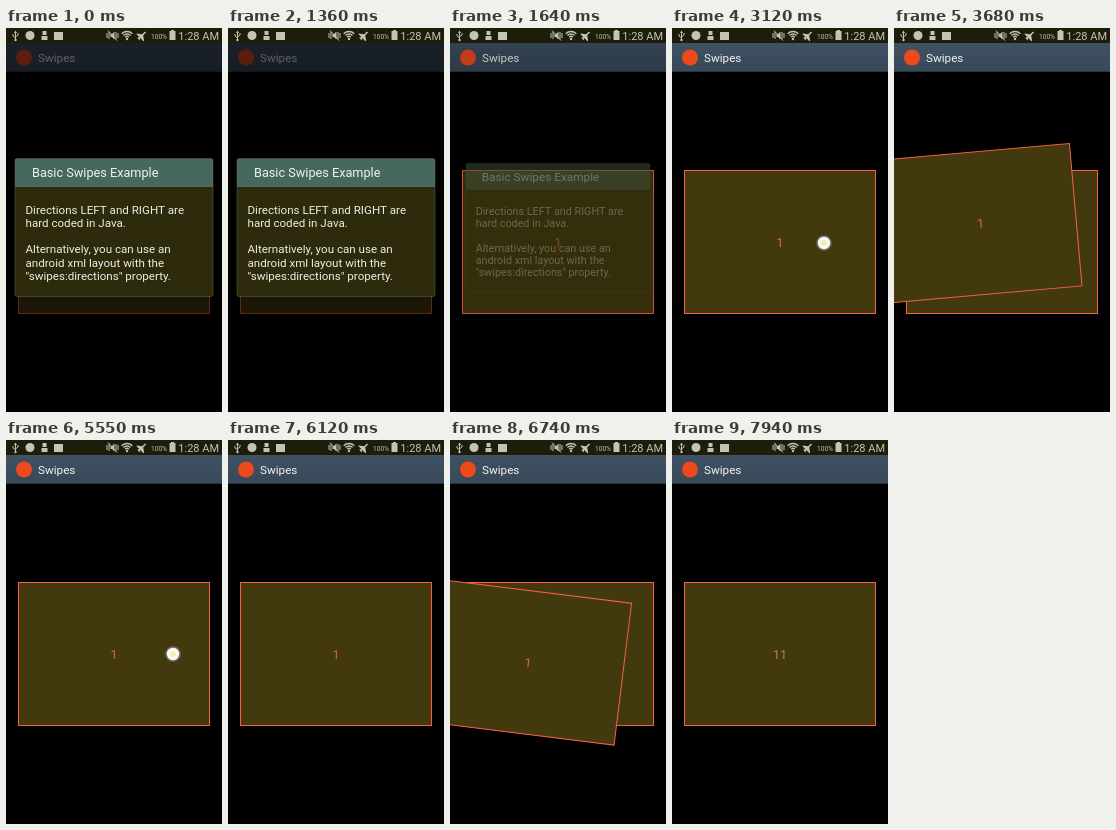
An HTML page with a canvas for the animation above (8000 ms loop, 216 by 384 pixels).

```html
<!DOCTYPE html>
<html lang="en">
<head>
<meta charset="utf-8">
<title>Swipes</title>
<style>
html, body { margin: 0; width: 100%; height: 100%; overflow: hidden; background: #000; }
canvas { display: block; width: 216px; height: 384px; }
</style>
</head>
<body>
<canvas id="stage"></canvas>
<script>
const W = 216, H = 384, LOOP = 8000;
const FONT = 'Roboto, "Noto Sans", sans-serif';
const canvas = document.getElementById('stage');
const ctx = canvas.getContext('2d');
const ratio = window.devicePixelRatio || 1;
canvas.width = W * ratio;
canvas.height = H * ratio;

const CARD = { x: 108, y: 214, w: 191, h: 143 };
const DIALOG = { x: 9, y: 130.5, w: 198, h: 138, split: 159 };
const TILT = 0.235;   // degrees per pixel of sideways drag
const RELEASE = 0.6;  // part of a gesture during which the finger is down

// side: 1 when held by the upper half, -1 by the lower; only the last drag is accepted
const gestures = [
  { start: 3120, end: 3800, touch: [152, 215], reach: [-112, -99], side: 1 },
  { start: 4480, end: 5100, touch: [119, 244], reach: [-4.5, 93], side: -1 },
  { start: 5550, end: 6120, touch: [167, 214], reach: [-100, -6], side: 1 },
  { start: 6290, end: 6860, touch: [150, 242], reach: [-110, 31], side: -1 },
  { start: 7480, end: 7940, touch: [62, 206], reach: [78, -9], side: 1, accepted: true }
];

const clamp = v => Math.max(0, Math.min(1, v));

// The finger speeds up; then the card springs back, or keeps flying if accepted.
function pull(p, accepted) {
  if (p < RELEASE || accepted) return (p / RELEASE) ** 2.4;
  return ((1 - p) / (1 - RELEASE)) ** 2;
}

function rect(color, x, y, w, h) {
  ctx.fillStyle = color;
  ctx.fillRect(x, y, w, h);
}

function disc(color, x, y, r) {
  ctx.fillStyle = color;
  ctx.beginPath();
  ctx.arc(x, y, r, 0, Math.PI * 2);
  ctx.fill();
}

function shape(color, path) {
  ctx.fillStyle = color;
  ctx.fill(new Path2D(path));
}

function line(color, path) {
  ctx.strokeStyle = color;
  ctx.lineWidth = 1;
  ctx.stroke(new Path2D(path));
}

function text(str, x, y, size, color, align = 'left') {
  ctx.font = `${size}px ${FONT}`;
  ctx.textAlign = align;
  ctx.fillStyle = color;
  ctx.fillText(str, x, y);
}

function statusBar() {
  const ink = '#c2c4b6';
  rect('#1e1d0a', 0, 0, W, 15);

  // usb
  line(ink, 'M9.5 4V12M7 6V8L9.5 10M12 5V7L9.5 9');
  shape(ink, 'M8 5L9.5 2.5L11 5Z');
  disc(ink, 9.5, 12, 1.2);

  disc(ink, 24, 7.5, 4.5);
  rect(ink, 36.5, 3, 4, 4);
  rect(ink, 35.5, 8, 6, 4);
  rect(ink, 48, 4, 9, 8);

  // muted sound
  line(ink, 'M101 5V10M103 4V11M110 4V11M112 5V10M102 2.5L111 12.5');
  shape(ink, 'M104.5 6H106L108.5 3.5V11.5L106 9H104.5Z');

  // wifi
  ctx.strokeStyle = ink;
  ctx.lineWidth = 1.4;
  for (let r = 2.5; r < 8; r += 2.5) {
    ctx.beginPath();
    ctx.arc(121, 11, r, -Math.PI * 0.75, -Math.PI * 0.25);
    ctx.stroke();
  }
  disc(ink, 121, 11, 1.2);

  // plane
  ctx.save();
  ctx.translate(136, 7.5);
  ctx.rotate(Math.PI / 4);
  rect(ink, -0.8, -5, 1.6, 10);
  shape(ink, 'M0 -1.5L5 2V3H-5V2ZM0 3L2 5H-2Z');
  ctx.restore();

  text('100%', 145, 10.5, 6.6, ink);
  rect(ink, 165, 2, 3, 2);
  rect(ink, 163.5, 3, 6, 9);
  text('1:28 AM', 213, 11.5, 11, ink, 'right');
}

function header() {
  const fill = ctx.createLinearGradient(0, 15, 0, 43);
  fill.addColorStop(0, '#3f5163');
  fill.addColorStop(1, '#384959');
  rect(fill, 0, 15, W, 28);
  rect('#2b343c', 0, 43, W, 1);
  disc('#ec4a1d', 18, 29.5, 8);
  text('Swipes', 32, 33.5, 11.7, '#f4f4ea');
}

function card(label, dx = 0, dy = 0, degrees = 0) {
  const { x, y, w, h } = CARD;
  ctx.save();
  ctx.translate(x + dx, y + dy);
  ctx.rotate(degrees * Math.PI / 180);
  rect('#42390f', -w / 2, -h / 2, w, h);
  ctx.strokeStyle = '#fb5f46';
  ctx.lineWidth = 1;
  ctx.strokeRect(-w / 2, -h / 2, w, h);
  text(label, 0, 4.7, 12.4, label === '1' ? '#e2633f' : '#bd8250', 'center');
  ctx.restore();
}

function finger(x, y) {
  disc('rgba(150,150,160,0.55)', x, y, 7.8);
  disc('#fbfbf4', x, y, 6.2);
  disc('#f1efb4', x, y, 3);
}

function dialog(t) {
  const k = clamp((t - 1440) / 290);
  if (k === 1) return;
  rect(`rgba(0,0,0,${0.6 * (1 - k)})`, 0, 15, W, H);

  const { x, y, w, h, split } = DIALOG;
  const cx = x + w / 2, cy = y + h / 2, scale = 1 - 0.1 * k;
  ctx.save();
  ctx.globalAlpha = 1 - k;
  ctx.translate(cx, cy);
  ctx.scale(scale, scale);
  ctx.translate(-cx, -cy);
  ctx.beginPath();
  ctx.roundRect(x, y, w, h, 2);
  ctx.fillStyle = '#2d2b0c';
  ctx.fill();
  ctx.save();
  ctx.clip();
  rect('#47685e', x, y, w, split - y);
  ctx.restore();
  ctx.strokeStyle = 'rgba(110,115,80,0.45)';
  ctx.lineWidth = 1;
  ctx.stroke();

  text('Basic Swipes Example', 26, 149, 12.7, '#f0f4f0');
  const lines = ['Directions LEFT and RIGHT are', 'hard coded in Java.', '',
    'Alternatively, you can use an', 'android xml layout with the', '"swipes:directions" property.'];
  lines.forEach((str, i) => text(str, 19.5, 185.8 + i * 13.2, 11.6, '#eceee4'));
  ctx.restore();
}

function cards(t) {
  const g = gestures.find(({ start, end }) => t >= start && t < end);
  if (!g) {
    const done = gestures.some(({ end, accepted }) => accepted && t >= end);
    card(done ? '11' : '1');
    return;
  }
  const p = (t - g.start) / (g.end - g.start);
  const [dx, dy] = g.reach.map(v => v * pull(p, g.accepted));
  card('11');
  card('1', dx, dy, TILT * dx * g.side);
  if (p < RELEASE) finger(g.touch[0] + dx, g.touch[1] + dy);
}

function draw(t) {
  ctx.setTransform(ratio, 0, 0, ratio, 0, 0);
  rect('#000', 0, 0, W, H);
  header();
  statusBar();
  cards(t);
  dialog(t);
  // a tap beside the dialog closes it
  if (t > 1365 && t < 1500) finger(112, 304);
}

const began = performance.now();
function tick() {
  draw((performance.now() - began) % LOOP);
  requestAnimationFrame(tick);
}
tick();
</script>
</body>
</html>
```
